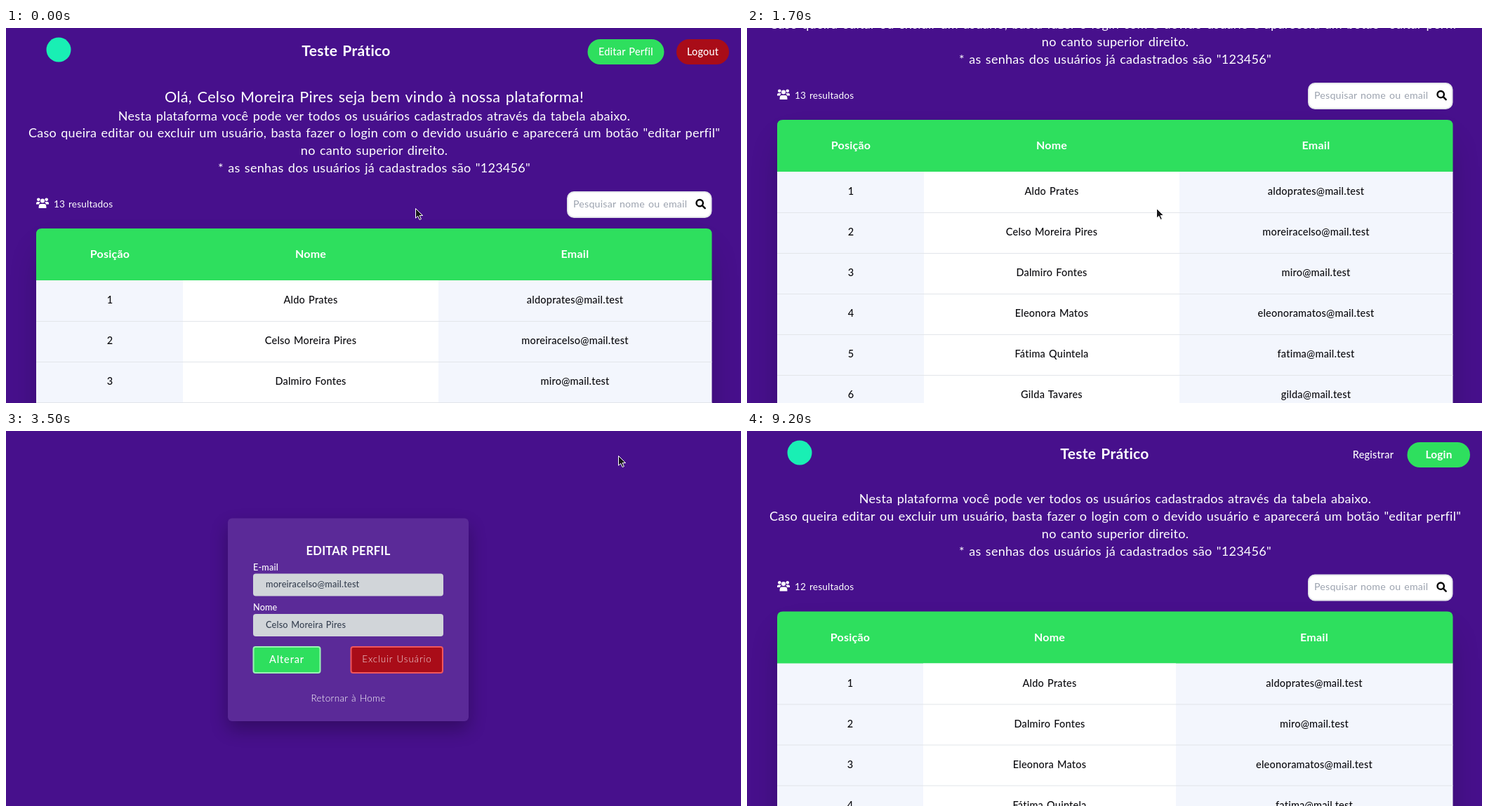
Write an HTML page that moves like this. It is 1047 px wide and 535 px high and loops after 9.6 s.

```html
<!DOCTYPE html>
<html lang="pt-BR">
<head>
<meta charset="utf-8">
<title>Teste Prático</title>
<style>
  html, body { margin: 0; width: 100%; height: 100%; overflow: hidden; background: #47108c; }
  svg { display: block; width: 1047px; height: 535px; }
  text { font-family: Lato, "Open Sans", sans-serif; letter-spacing: .015em; word-spacing: .078em; fill: #fff; }
  .mid { text-anchor: middle; }
  .h1 { font-size: 21px; font-weight: 700; }
  .hello { font-size: 21.6px; }
  .para { font-size: 18px; }
  .count { font-size: 13.6px; }
  .hint { font-size: 14.2px; fill: #9ca3af; }
  .th { font-size: 16px; font-weight: 700; }
  .td { font-size: 14.5px; font-weight: 500; fill: #0b0b0f; }
  .pill { font-size: 14.4px; font-weight: 500; }
  .login { font-size: 15.4px; font-weight: 700; }
  .cardTitle { font-size: 16.6px; font-weight: 700; }
  .label { font-size: 12.6px; font-weight: 500; }
  .value { font-size: 12.7px; font-weight: 500; fill: #374151; }
  .save { font-size: 14.4px; font-weight: 500; letter-spacing: .9px; }
  .remove { font-size: 13.5px; font-weight: 300; letter-spacing: .8px; fill: #f3dcdf; }
  .back { font-size: 13.5px; font-weight: 300; letter-spacing: .3px; }
</style>
</head>
<body>
<svg id="stage" viewBox="0 0 1047 535"></svg>
<script>
const GREEN = '#2edf5e', RED = '#a90c18', DARK_RED = '#8b0d1a', PALE = '#f3f6fd';
const LOOP = 9600, STEP = 100, ROW = 58;

const people = [
  ['Aldo Prates', 'aldoprates@mail.test'],
  ['Celso Moreira Pires', 'moreiracelso@mail.test'],
  ['Dalmiro Fontes', 'miro@mail.test'],
  ['Eleonora Matos', 'eleonoramatos@mail.test'],
  ['Fátima Quintela', 'fatima@mail.test'],
  ['Gilda Tavares', 'gilda@mail.test'],
  ['Heitor Bastos', 'heitor@mail.test']
];
const [userName, userMail] = people[1];

const text = (cls, x, y, s) => `<text class="${cls}" x="${x}" y="${y}">${s}</text>`;
const mid = (cls, x, y, s) => text(cls + ' mid', x, y, s);
const rect = (x, y, w, h, fill, r = 0, more = '') =>
  `<rect x="${x}" y="${y}" width="${w}" height="${h}" rx="${r}" fill="${fill}" ${more}/>`;
const shadow = (x, y, w, h, blur, alpha) =>
  rect(x, y, w, h, '#000', 8, `opacity="${alpha}" style="filter:blur(${blur}px)"`);

const peopleIcon = `<g fill="#fff">
  <circle cx="46.3" cy="244.7" r="2.3"/><circle cx="57.7" cy="244.7" r="2.3"/><circle cx="52" cy="246.6" r="3"/>
  <path d="M43 251.5v-1.6q0-2 2-2h2.4q1 0 1.3.5-1.4 1.2-1.7 3.1z
    M61 251.5v-1.6q0-2-2-2h-2.4q-1 0-1.3.5 1.4 1.2 1.7 3.1z
    M46.6 257v-1.6q0-4.4 3-4.4h4.8q3 0 3 4.4v1.6z"/></g>`;

const searchBox = rect(800, 234, 204.5, 36, '#fff', 9, 'stroke="#e5e7eb" stroke-width="2"')
  + text('hint', 808, 255.5, 'Pesquisar nome ou email')
  + `<g fill="none" stroke="#000" stroke-width="2.4"><circle cx="988.2" cy="249.7" r="4.7"/>
     <path d="M991.7 253.2l4 4" stroke-linecap="round"/></g>`;

function table(list, edges, centers) {
  const [a, b] = edges, height = list.length * ROW;
  const cells = list.map((p, i) => {
    const y = 360 + i * ROW;
    return [i + 1, ...p].map((s, k) => mid('td', centers[k], y + 33, s)).join('')
      + rect(43, y + ROW, 962.5, 1, '#e2e5ea');
  }).join('');
  const heads = ['Posição', 'Nome', 'Email'].map((s, k) => mid('th', centers[k], 328, s)).join('');
  return shadow(55, 323, 938.5, 830, 25, .3)
    + `<path d="M43 360.5V294q0-8 8-8H997.5q8 0 8 8V360.5z" fill="${GREEN}"/>` + heads
    + rect(43, 360, 962.5, height, PALE) + rect(a, 360, b - a, height, '#fff') + cells;
}

function home(logged) {
  const list = logged ? people : people.filter((p, i) => i !== 1);
  const bar = logged
    ? mid('h1', 484.5, 40, 'Teste Prático')
      + rect(828.5, 16, 109, 36, GREEN, 18, 'id="edit"') + mid('pill', 883, 38.5, 'Editar Perfil')
      + rect(955, 16, 75, 36, RED, 18) + mid('pill', 992.5, 38.5, 'Logout')
    : mid('h1', 509.5, 40, 'Teste Prático') + mid('pill', 892, 38.5, 'Registrar')
      + rect(940.5, 16, 89.5, 36, GREEN, 18) + mid('login', 985.5, 38.5, 'Login');
  const lines = [
    'Nesta plataforma você pode ver todos os usuários cadastrados através da tabela abaixo.',
    'Caso queira editar ou excluir um usuário, basta fazer o login com o devido usuário e aparecerá um botão "editar perfil"',
    'no canto superior direito.',
    '* as senhas dos usuários já cadastrados são "123456"'
  ].map((s, i) => mid('para', 524.5, 131.5 + i * 24.9, s)).join('');
  const hello = logged ? mid('hello', 524.5, 105.5, `Olá, ${userName} seja bem vindo à nossa plataforma!`) : '';
  const grid = logged ? table(list, [252, 616], [148, 434, 810.5]) : table(list, [251, 611], [147, 431, 808]);
  return `<circle cx="75" cy="31" r="17.5" fill="#19efb4"/>` + bar + hello
    + `<g transform="translate(0 ${logged ? 0 : -28.5})">` + lines + peopleIcon
    + text('count', 68, 255.5, `${logged ? 13 : 12} resultados`) + grid + searchBox + '</g>';
}

const field = (y, label, value) => text('label', 352, y - 5, label)
  + rect(352, y, 271, 32, '#d1d5d9', 4) + text('value', 370, y + 19.5, value);

const editor = shadow(316, 136, 343, 290, 13, .28)
  + rect(316, 124.5, 343, 289.5, '#5b2a98', 6)
  + mid('cardTitle', 487.5, 177, 'EDITAR PERFIL')
  + field(203.5, 'E-mail', userMail) + field(261, 'Nome', userName)
  + rect(352.5, 308, 95, 37, GREEN, 3, 'stroke="#9af5b4" stroke-width="2"') + mid('save', 400, 330.5, 'Alterar')
  + rect(491.5, 308, 130.5, 37, RED, 3, 'id="remove" stroke="#f0565c" stroke-width="2"')
  + mid('remove', 557, 330, 'Excluir Usuário')
  + mid('back', 487.5, 385.5, 'Retornar à Home');

const arrow = `<path id="arrow" d="M.5.5V14.2L3.7 11.3 6.1 16.5 8.4 15.5 6.1 10.5H10.6z"
  fill="#17171a" stroke="#fff" stroke-width="1"/>`;
const hand = `<path id="hand" d="M-1.6 1.2Q-1.6 0 -.3 0 1 0 1 1.2V5.4Q2.6 4.8 3.4 5.8 5 5.3 5.7 6.6 7.6 6.3 7.6 8.2
  V11.2L6.4 15.5H-1L-5 9.8Q-5.4 8.3-4 8.1L-1.6 9.8z" fill="#fff" stroke="#222" stroke-width=".8"/>`;

const stage = document.getElementById('stage');
stage.innerHTML = `<g id="logged">${home(true)}</g><g id="editor">${editor}</g>
  <g id="guest">${home(false)}</g><g id="cursor">${arrow}${hand}</g>`;
const el = id => document.getElementById(id);
const show = (id, on) => el(id).setAttribute('display', on ? 'inline' : 'none');
const move = (id, x, y) => el(id).setAttribute('transform', `translate(${x} ${y})`);

// Rows are [time, ...values]
const scroll = [[0, 0], [1000, 0], [1100, 14], [1400, 103.5], [1600, 168], [1700, 155], [2000, 61], [2200, 0]];
const path = [
  [0, 583, 257], [2400, 583, 257], [2800, 865, 74], [3100, 868, 40], [3400, 872, 35], [3700, 872, 35],
  [3900, 786, 58], [4000, 786, 58], [4300, 560, 318], [4400, 560, 318], [4500, 545, 347],
  [4700, 540, 267], [4900, 613, 331], [5000, 613, 331], [5100, 569, 326], [6600, 569, 326],
  [6700, 566, 320], [6800, 566, 320], [7200, 487, 181], [7300, 487, 181], [7400, 488, 167],
  [7500, 488, 167], [7600, 501, 188], [8200, 501, 188], [8400, 383, 136], [8600, 383, 136],
  [8800, 69, 69], [8900, 69, 69], [9100, 26, 7]
];

function at(keys, t) {
  const i = keys.findIndex(k => k[0] > t);
  if (i < 0) return keys[keys.length - 1].slice(1);
  const a = keys[i - 1], b = keys[i], p = (t - a[0]) / (b[0] - a[0]);
  return a.slice(1).map((v, k) => v + (b[k + 1] - v) * p);
}
const within = (t, ...spans) => spans.some(([a, b]) => t >= a && t < b);

function draw(now) {
  const t = Math.floor(now % LOOP / STEP) * STEP;
  show('logged', t < 3500);
  show('editor', within(t, [3500, 5600]));
  show('guest', t >= 5600);
  move('logged', 0, -at(scroll, t)[0]);
  move('cursor', ...at(path, t));
  show('cursor', t < 9200);
  const pointing = within(t, [3000, 3500], [4300, 4500], [4900, 6700]);
  show('hand', pointing);
  show('arrow', !pointing);
  el('edit').setAttribute('fill', within(t, [3000, 3500]) ? '#25c351' : GREEN);
  el('remove').setAttribute('fill', pointing ? DARK_RED : RED);
}

const start = performance.now();
function tick() {
  draw(performance.now() - start);
  requestAnimationFrame(tick);
}
tick();
</script>
</body>
</html>
```
